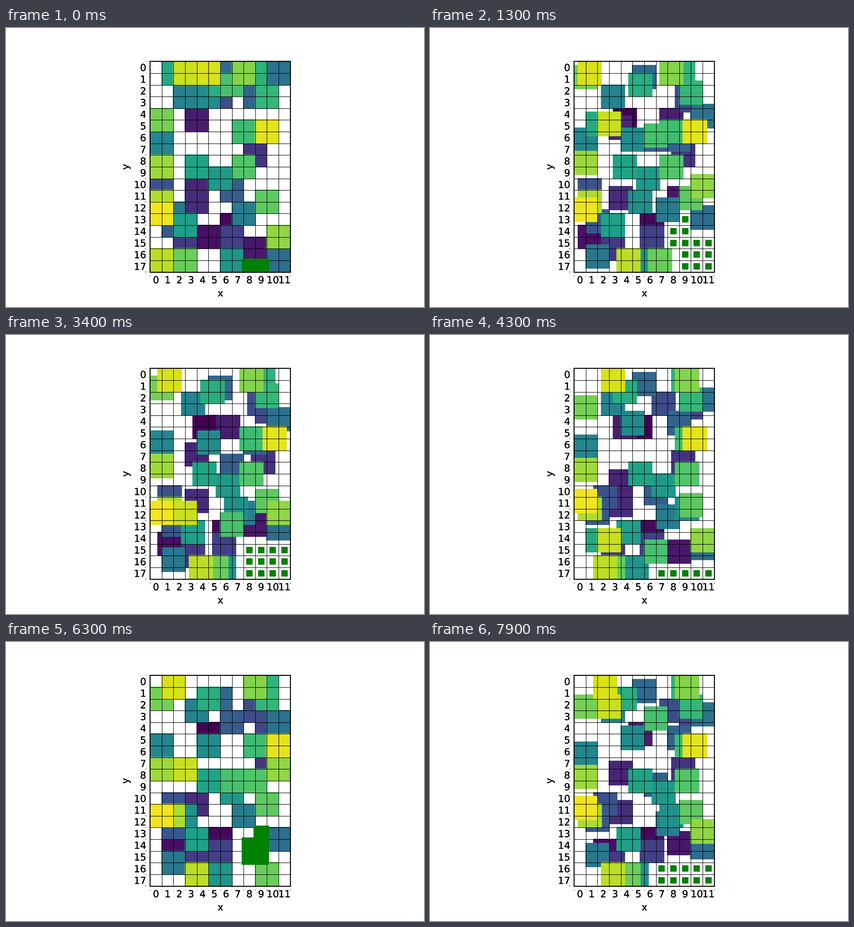
These frames come from a looping animation (917x611 px, 8000 ms). A matplotlib script:

```python
import matplotlib.pyplot as plt
import numpy as np
from matplotlib.animation import FuncAnimation
from matplotlib.patches import Rectangle
from matplotlib.patheffects import Normal

W, H, DPI = 917, 611, 152.8
COLS, ROWS = 12, 18
FRAMES, SUB = 80, 3          # three frames per one-cell step
AHEAD = 8                    # extra steps used to drop dead ends
PX = 72 / DPI                # one pixel in points
BIG, SMALL = 33.8 * PX, 14 * PX


def bounce(t, a, b):
    """Position at time t when shuttling between a and b, one cell per step."""
    n = abs(b - a)
    d = n - abs(t % (2 * n) - n)
    return a + d * np.sign(b - a)


def h(row, a, b):
    return lambda t: (bounce(t, a, b), row)


def v(col, a, b):
    return lambda t: (col, bounce(t, a, b))


# Blocks of 2 x 2 cells, from the lowest layer to the top one
dark = [
    h(4, 3, 5), h(13, 6, 5), h(14, 4, 0), v(8, 15, 8), h(4, 3, 10), v(3, 9, 2),
    v(3, 11, 10), h(7, 8, 9), h(15, 2, 3), h(14, 6, 5), v(9, 2, 3), h(2, 5, 9),
    h(10, 0, 2), v(1, 13, 11), v(6, 10, 3), v(8, 2, 6), v(5, 0, 1), v(10, 16, 12),
    v(10, 0, 4), v(1, 12, 16), v(7, 12, 11), h(2, 2, 3), v(0, 6, 5), v(4, 2, 6),
]
light = [
    h(11, 9, 2), h(16, 6, 4), h(9, 5, 7), h(13, 2, 4), h(8, 3, 5), v(1, 0, 14),
    h(1, 5, 3), h(0, 8, 9), v(9, 2, 1), h(5, 7, 9), v(6, 1, 15), h(8, 7, 9),
    v(9, 11, 10), h(16, 2, 9), v(0, 4, 0), h(0, 7, 9), v(10, 14, 7), v(0, 8, 7),
    h(11, 0, 1), h(16, 0, 4), v(2, 0, 14), h(0, 4, 0), h(5, 9, 10), v(0, 12, 10),
]
blocks = dark + light


def open_cells(step):
    """Cells no block touches between this step and the next."""
    free = {(x, y) for x in range(COLS) for y in range(ROWS)}
    for t in (step, step + 1):
        for block in blocks:
            x, y = block(t)
            free -= {(x + i, y + j) for i in (0, 1) for j in (0, 1)}
    return free


def flood(seed, free):
    seen, todo = set(seed), list(seed)
    while todo:
        x, y = todo.pop()
        for cell in ((x + 1, y), (x - 1, y), (x, y + 1), (x, y - 1)):
            if cell in free and cell not in seen:
                seen.add(cell)
                todo.append(cell)
    return seen


# Cells reachable during each move, then without the pockets that close up
start = {(8, 17), (9, 17)}
spread, reach = [], start
for step in range(FRAMES // SUB + AHEAD):
    free = open_cells(step)
    reach = flood(reach & free, free)
    spread.append(reach)
for step in reversed(range(len(spread) - 1)):
    spread[step] = flood(spread[step] & spread[step + 1], spread[step])
safe = [a & b for a, b in zip([start] + spread, spread)]

plt.rcParams.update({"font.family": "DejaVu Sans", "font.size": 10})
fig = plt.figure(figsize=(W / DPI, H / DPI), dpi=DPI, facecolor="white")
fig.subplots_adjust(left=0.125, right=0.9, bottom=0.125, top=0.88)
ax = fig.add_subplot(aspect="equal")
ax.set_xlim(0, COLS)
ax.set_ylim(ROWS, 0)
for spine in ax.spines.values():
    spine.set_linewidth(1)

for axis, n in ((ax.xaxis, COLS), (ax.yaxis, ROWS)):
    axis.set_ticks(range(n + 1), labels=[str(i) for i in range(n + 1)])
    axis.set_ticks([i + 0.5 for i in range(n)],
                   labels=[str(i) for i in range(n)], minor=True)
ax.tick_params(which="both", length=0, pad=4)
ax.tick_params(which="major", labelsize=1)
texts = [
    fig.text(470.5 / W, 1 - 588 / H, "x", ha="center", va="baseline"),
    fig.text(269 / W, 1 - 304 / H, "y", ha="center", va="baseline",
             rotation=90, rotation_mode="anchor"),
]
for axis in (ax.xaxis, ax.yaxis):
    texts += axis.get_ticklabels(which="both")
for text in texts:
    text.set_path_effects([Normal()] * 3)   # heavier glyph edges

for x in range(1, COLS):
    ax.axvline(x, color="black", lw=0.5, zorder=2)
for y in range(1, ROWS):
    ax.axhline(y, color="black", lw=0.5, zorder=2)

tiles = [ax.add_patch(Rectangle((0, 0), 2, 2, lw=1, zorder=1,
                                color=plt.cm.viridis(i / len(blocks))))
         for i in range(len(blocks))]
marks, = ax.plot([], [], "s", color="green", mew=0, zorder=2.2)


def draw(frame):
    t = frame / SUB
    for tile, block in zip(tiles, blocks):
        tile.set_xy(block(t))
    step, part = divmod(frame, SUB)
    cells = sorted(spread[step] if part else safe[step])
    marks.set_data([x + 0.5 for x, _ in cells], [y + 0.5 for _, y in cells])
    marks.set_markersize(SMALL if part else BIG)
    return [*tiles, marks]


anim = FuncAnimation(fig, draw, frames=FRAMES, interval=100, repeat=True,
                     repeat_delay=0, blit=False)
plt.show()
```
